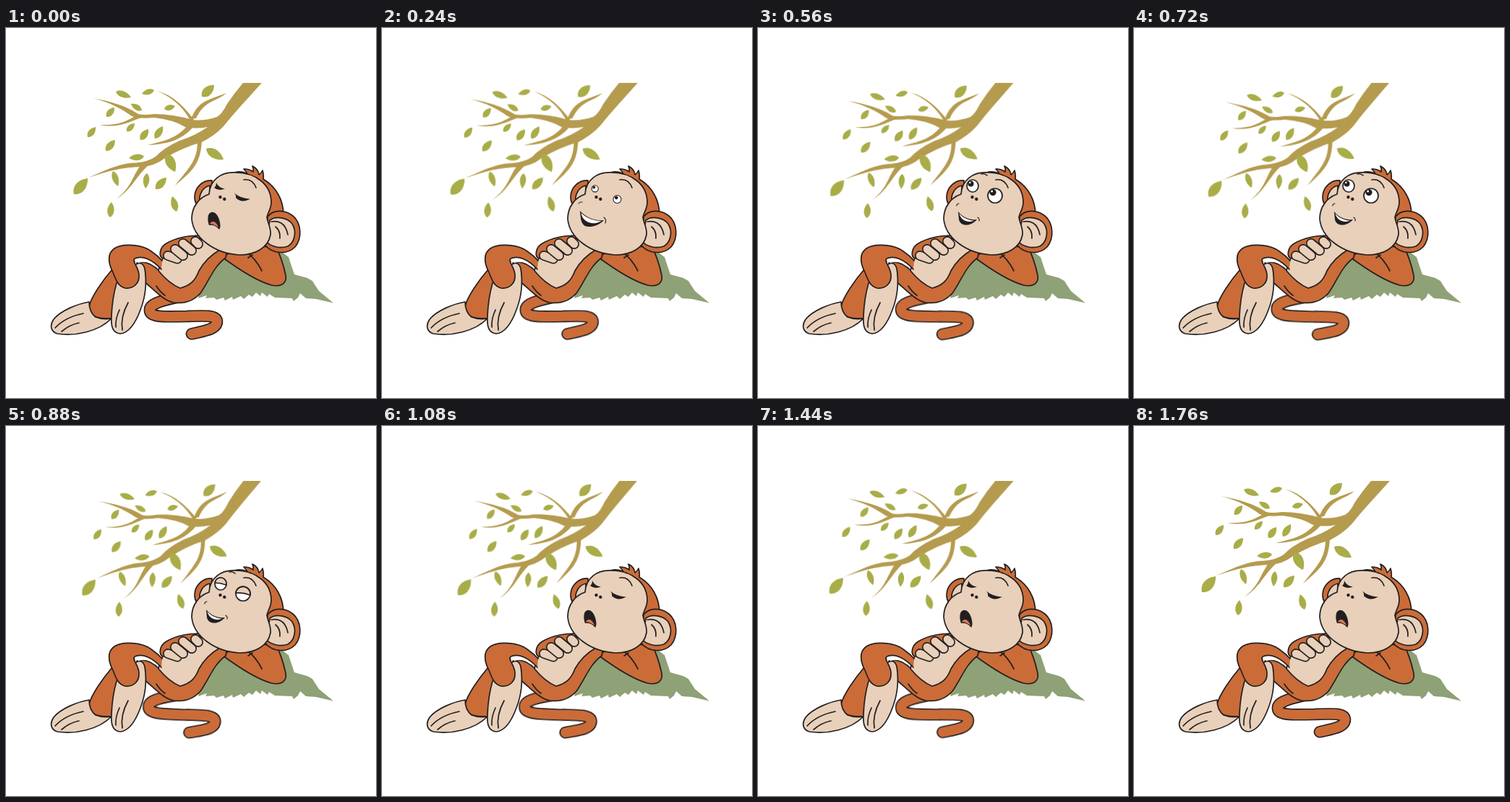
An HTML page for the animation above (2880 ms loop, 512 px wide and 512 px high).

```html
<!DOCTYPE html>
<html lang="en">
<head>
<meta charset="utf-8">
<title>Dozing monkey</title>
<style>
  html, body { margin: 0; width: 100%; height: 100%; overflow: hidden; background: #fff; }
  svg { display: block; width: 100%; height: 100%; }
  .ink { stroke: #231f20; stroke-width: 1.7; stroke-linecap: round; stroke-linejoin: round; fill: none; }
  .fine { stroke-width: 1.1; }
  .fur { fill: #cb6c38; }
  .skin { fill: #e8d0ba; }
  .white { fill: #fff; }
  .dark { fill: #231f20; }
  .wood { fill: #b59b4e; }
  .leaf { fill: #a9ad48; }
  .tube { fill: none; stroke-linecap: round; stroke-linejoin: round; }

  .tree, .tail, .face { animation: 2880ms infinite; }
  .tree { transform-origin: 338px 76px; animation-name: sway; }
  .tail { transform-origin: 238px 360px; animation-name: swish; }
  .face { animation-timing-function: step-end; }
  #yawn { animation-name: yawn; }
  #grin { animation-name: grin; }
  #stare { animation-name: stare; }
  #drowse { animation-name: drowse; }

  /* Sway runs from 160 ms to 1760 ms and turns at 960 ms, in 40 ms steps. */
  @keyframes sway {
    0% { transform: rotate(0deg) scale(1); }
    5.5556% { transform: rotate(0deg) scale(1); animation-timing-function: steps(20); }
    33.3333% { transform: rotate(-2.3deg) scale(.971); animation-timing-function: steps(20); }
    61.1111%, 100% { transform: rotate(0deg) scale(1); }
  }
  @keyframes swish {
    0% { transform: rotate(0deg); }
    5.5556% { transform: rotate(0deg); animation-timing-function: steps(20); }
    33.3333% { transform: rotate(3.5deg); animation-timing-function: steps(20); }
    61.1111%, 100% { transform: rotate(0deg); }
  }
  @keyframes yawn {
    0% { visibility: visible; }
    1.3889% { visibility: hidden; }
    33.3333%, 100% { visibility: visible; }
  }
  @keyframes grin {
    0% { visibility: hidden; }
    1.3889% { visibility: visible; }
    19.4444%, 100% { visibility: hidden; }
  }
  @keyframes stare {
    0% { visibility: hidden; }
    19.4444% { visibility: visible; }
    27.7778%, 100% { visibility: hidden; }
  }
  @keyframes drowse {
    0% { visibility: hidden; }
    27.7778% { visibility: visible; }
    33.3333%, 100% { visibility: hidden; }
  }
</style>
</head>
<body>
<svg viewBox="0 0 512 512">
  <defs>
    <clipPath id="sky"><path d="M0 76H512V300H0Z"/></clipPath>
    <path id="tailLine" d="M240 372C215 377 198 382 199 391C200 402 228 399 250 399C275 398 291 397 292 406C292 417 275 419 257 423.300"/>
    <g id="smile">
      <path class="dark" d="M277 254C278 263 277 268 282 271C289 275 298 271 303 265C293 266 283 262 277 254Z"/>
      <path class="white" d="M278.500 257C284 263 291 266 299 266.500C292 270 281 267 278.500 257Z"/>
      <path class="ink fine" d="M275 246Q275 243 278 243M304 262Q307 264 306 267"/>
    </g>
    <g id="eyeballs" class="ink">
      <ellipse class="white" cx="297" cy="218.500" rx="8" ry="8.500"/>
      <circle class="white" cx="328" cy="232" r="10"/>
    </g>
  </defs>

  <g clip-path="url(#sky)">
    <g class="tree">
      <g class="wood">
        <path d="M331 70L328 76Q316 90 306 105Q299 119 292 123Q274 129 258 127Q230 119 205 119Q190 121 183 119C165 107 145 102 121 97C146 104 160 112 174 122Q184 126 205 124Q232 127 248 137Q262 140 279 137Q262 149 240 156Q218 166 207 178Q197 185 180 186.500C158 187 142 195 114 207C145 197 160 193 188 192Q206 191 220 180Q245 165 271 158Q290 148 301 136Q313 121 324 109L353 77L359 70Z"/>
        <path d="M187 189C175 204 174 221 152 237C174 224 178 207 198 189Z"/>
        <path d="M265 156C265 184 254 192 234 218C259 197 270 187 271 154Z"/>
        <path d="M250 136C235 154 218 156 196 162C221 161 242 156 258 138Z"/>
        <path d="M183 120C168 127 161 135 130 134C154 139 168 131 190 123Z"/>
        <path d="M255 128C247 113 233 97 209 87C231 93 246 108 260 127Z"/>
        <path d="M256 126C266 100 280 100 305 90C288 104 276 99 263 125Z"/>
      </g>
      <g class="leaf" id="leaves"></g>
    </g>
  </g>

  <path fill="#8fa176" d="M266 374L272 340L296 314L350 315L383 311L391 317L399 341L417 346L424 350L433 364L453 380.500L429 375L415 374L407 367L404 373L398 378L396 374L372 373L364 368L362 372L354 366L352 371L346 366L341 372L336 369L329 375L325 371L314 376L313 372L303 377L301 373L291 376L288 373L276 374L278 370Z"/>

  <g class="tail tube">
    <use href="#tailLine" stroke="#231f20" stroke-width="16.600"/>
    <use href="#tailLine" stroke="#cb6c38" stroke-width="13.400"/>
  </g>

  <g class="ink">
    <path class="fur" d="M299 317C318 331 345 350 368 356C382 359 389 352 387 342C384 328 380 315 374 304L330 300Z"/>
    <path d="M334 311Q346 320 354 336M335 318L341 314"/>

    <!-- far leg -->
    <path class="fur" d="M147 334C134 349 118 372 115 385C115 398 124 403 147 402L160 356Z"/>
    <path class="skin" d="M115 379C98 382 76 391 66 403C60 412 62 420 71 423C96 427 128 420 146 402Q134 404 124 400Q115 393 115 379Z"/>
    <path d="M68 415Q82 400 107 395M77 420Q87 411 101 408"/>

    <!-- torso -->
    <path class="fur" d="M304 318C287 330 280 352 269 367C259 378 247 382 232 380C217 377 205 362 190 350L181 325Q196 320 213 337L240 320L270 292L306 307Z"/>
    <path class="skin" d="M220 313Q213 324 211 336Q226 354 241 360C256 356 262 349 267 336C275 322 287 312 296 307L268 291Z"/>
    <path d="M208 357Q213 365 220 370"/>
    <path class="fur" d="M270 287C250 287 234 291 222 298C212 304 211 316 217 319L230 316L262 300Z"/>

    <path class="skin" d="M180 327Q189 322 192 333C195 352 193 372 186 390C179 409 170 422 158 423C147 422 145 412 146 398Q147 374 153 353Z"/>
    <path d="M157 390Q151 403 152 414M169 380Q158 400 161 418"/>

    <!-- near leg -->
    <path class="white" stroke="none" d="M178 320C190 315 202 322 209 330Q196 321 183 325Z"/>
    <path class="fur" d="M215 334C203 321 189 314 178 319C174 323 183 330 184 341C185 354 176 361 165 360C155 358 152 348 148 338C141 325 140 312 150 305C162 297 190 300 201 309Q210 315 216 322"/>
  </g>

  <g class="tube" id="fingers"></g>

  <!-- head -->
  <g class="ink">
    <path class="fur" d="M285 211C271 210 261 222 261 234Q261 240 264 244L284 234Z"/>
    <path class="skin" d="M282 218C272 220 267 231 268 239L282 231Z"/>
    <path class="fur" d="M316 200Q326 197 334 202Q332 198 329 195Q337 195 342 199Q343 195 341 191Q349 195 350 203Q354 200 355 197Q357 204 356 209C374 220 384 238 384 259L366 286L340 240Z"/>
    <path class="fur" d="M362 261C370 251 386 251 397 260C409 270 410 291 400 303C389 314 370 313 359 301Z"/>
    <path class="skin" d="M365 266C374 259 390 263 396 271C403 282 399 297 390 302C379 306 366 302 361 296Z"/>
    <path d="M367 268Q386 265 390 286M373 275Q380 281 379 291"/>
    <path class="skin" d="M281 230C282 210 298 199 317 200C346 200 367 217 367 241C367 251 362 255 361 262C362 270 367 276 366 286C363 304 345 314 323 314C288 312 259 290 257 264C257 247 268 234 281 230Z"/>
    <path d="M329 210Q341 208 346 221"/>
  </g>
  <g class="dark">
    <circle cx="296.500" cy="234" r="2.200"/>
    <circle cx="302.300" cy="236.700" r="2.200"/>
  </g>

  <g class="face" id="yawn">
    <path class="dark" d="M291 214Q294 221 303 222.500Q294 226 288 221Q291 219 291 214ZM316 228.500Q325 236 338 236.500Q326 243 318 235Q319 232 316 228.500Z"/>
    <path class="dark" d="M280 259C284 251 292 255 295 265C297 272 297 276 295 279C292 275 287 272 281 273C279 268 279 263 280 259Z"/>
    <path fill="#d9765a" d="M282 271C286 264 292 269 294 276C290 273 286 271 282 271Z"/>
  </g>

  <g class="face" id="grin">
    <g class="ink fine">
      <circle class="white" cx="294.700" cy="222.300" r="4.600"/>
      <circle class="white" cx="325.500" cy="237" r="5.500"/>
      <path d="M272 243Q274 240 277 241M307 262Q311 265 309 270"/>
    </g>
    <g class="dark">
      <circle cx="293.300" cy="220.500" r="2"/>
      <circle cx="324.300" cy="234.800" r="2.400"/>
      <path d="M274 253C275 264 275 270 281 274C290 277 300 273 307 266C294 267 282 262 274 253Z"/>
    </g>
    <path class="white" d="M275.500 256C283 263 293 267 303.500 267C295 273 278 271 275.500 256Z"/>
  </g>

  <g class="face" id="stare">
    <use href="#eyeballs"/>
    <g class="dark">
      <circle cx="294.500" cy="215.500" r="4"/>
      <circle cx="325" cy="227.500" r="4.600"/>
    </g>
    <circle class="white" cx="293.300" cy="214" r="1.200"/>
    <circle class="white" cx="323.700" cy="226" r="1.400"/>
    <path class="ink" d="M309 202Q314 201 317 204"/>
    <use href="#smile"/>
  </g>

  <g class="face" id="drowse">
    <use href="#eyeballs"/>
    <g class="ink">
      <path class="skin" d="M289 217A8 8.500 0 0 1 305 220Q297 217 289 217ZM318 231A10 10 0 0 1 338 234Q328 230 318 231Z"/>
      <path d="M309 202Q314 201 317 204"/>
    </g>
    <use href="#smile"/>
  </g>
</svg>
<script>
  const SVG = "http://www.w3.org/2000/svg";
  function addPath(parent, attrs) {
    const path = document.createElementNS(SVG, "path");
    for (const name in attrs) path.setAttribute(name, attrs[name]);
    parent.appendChild(path);
  }

  // Each leaf: base x, y, tip x, y, width.
  const leaves = [
    [152, 88, 173, 96, 9], [205, 86, 188, 91, 8], [271, 95, 288, 79, 13],
    [139, 123, 150, 110, 9], [188, 114, 173, 105, 8], [219, 112, 234, 108, 8],
    [113, 151, 124, 137, 9], [167, 143, 178, 132, 8], [186, 155, 197, 140, 10],
    [206, 153, 217, 136, 10], [138, 170, 151, 155, 10], [191, 178, 170, 180, 9],
    [222, 174, 234, 199, 14], [277, 167, 301, 182, 13], [94, 230, 113, 208, 15],
    [148, 198, 155, 219, 9], [195, 201, 193, 222, 9], [207, 223, 222, 207, 11],
    [144, 262, 146, 241, 10], [236, 254, 230, 233, 10]
  ];
  const leafGroup = document.getElementById("leaves");
  for (const [x, y, tipX, tipY, width] of leaves) {
    const dx = tipX - x, dy = tipY - y, len = Math.hypot(dx, dy);
    const at = (along, across) => {
      const k = across * width / len;
      return `${x + dx * along - dy * k} ${y + dy * along + dx * k}`;
    };
    addPath(leafGroup, {
      d: `M${x} ${y}C${at(.25, .7)} ${at(.7, .55)} ${tipX} ${tipY}C${at(.7, -.55)} ${at(.25, -.7)} ${x} ${y}Z`
    });
  }

  const fingers = ["M224 315L237 319.500", "M234 306L245 315", "M245 298L257 308", "M262 295L266 299"];
  const fingerGroup = document.getElementById("fingers");
  for (const d of fingers) {
    addPath(fingerGroup, { d, stroke: "#231f20", "stroke-width": 14 });
    addPath(fingerGroup, { d, stroke: "#e8d0ba", "stroke-width": 10.700 });
  }
</script>
</body>
</html>
```
